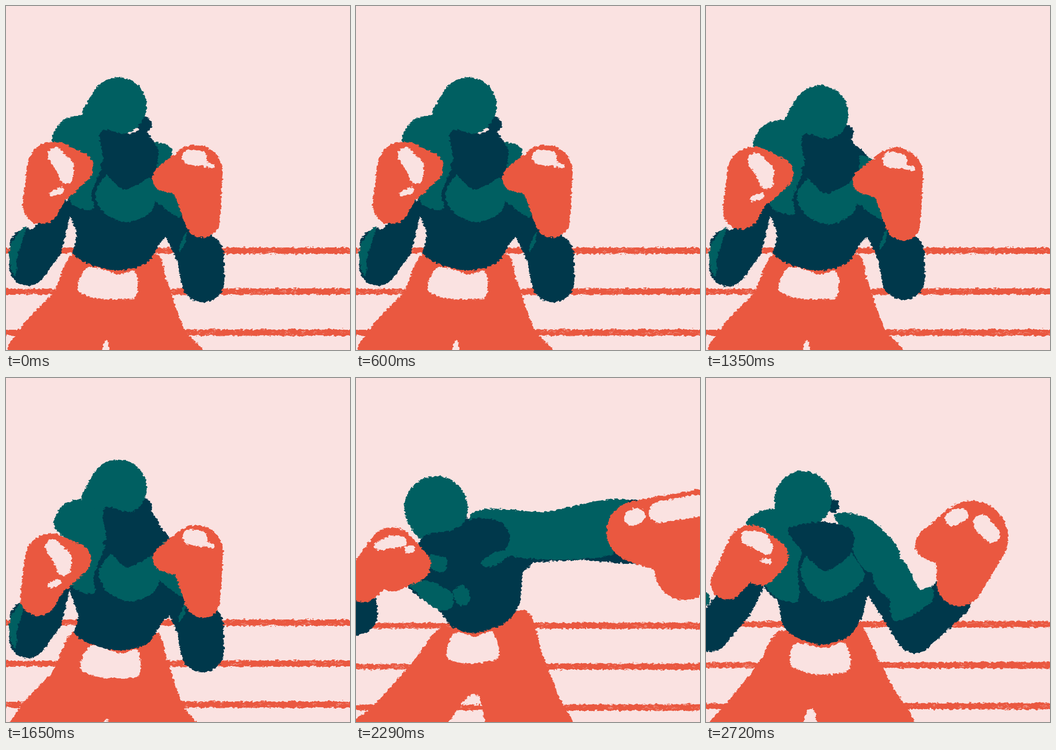
Recreate the animation shown at these times as an HTML page. Size 748 by 748 pixels, loop 2790 ms.

```html
<!DOCTYPE html>
<html lang="en">
<head>
<meta charset="utf-8">
<title>Boxer</title>
<style>
  html, body { margin: 0; width: 100%; height: 100%; overflow: hidden; background: #fae2e1; }
  svg { display: block; width: 100vw; height: 100vh; }
</style>
</head>
<body>
<svg viewBox="0 0 748 748">
  <filter id="chalk" filterUnits="userSpaceOnUse" x="-20" y="-20" width="788" height="788" color-interpolation-filters="sRGB">
    <feTurbulence type="fractalNoise" baseFrequency="0.14 0.2" numOctaves="3" seed="4"/>
    <feDisplacementMap in="SourceGraphic" scale="9" xChannelSelector="R" yChannelSelector="G"/>
  </filter>
  <g filter="url(#chalk)">
    <g id="ropes"></g>
    <g id="boxer"></g>
  </g>
</svg>
<script>
const PINK = '#fae2e1', RED = '#ea5840', TEAL = '#005f61', NAVY = '#00384b';
const LOOP = 2790;
const COLORS = {};
const paint = (color, names) => names.split(' ').forEach(name => COLORS[name] = color);
paint(RED, 'shorts gloveL gloveR');
paint(PINK, 'belt shineL glintL shineR glintR');
paint(NAVY, 'torso armL armR ear face');
paint(TEAL, 'back chest pecR shoulder head lightL lightR');

// Key points per part, in paint order: "x,y" bends a soft outline, "x,y,radius" is a disc in a limb.
const pose = parts => Object.fromEntries(Object.entries(parts).map(
  ([name, text]) => [name, text.split(' ').map(p => p.split(',').map(Number))]));

const guard = pose({
  shorts: '148,538 103,622 40,690 4,765 200,765 218,728 228,765 432,765 388,704 350,598 328,540 240,570',
  belt: '179,568 245,584 280,578 282,632 240,638 195,635 156,616',
  armR: '372,482,30 423,545,51 428,597,47',
  armL: '122,442,20 82,520,41 48,568,41 45,520,36',
  torso: '150,380 133,428 140,458 154,500 147,540 195,566 245,575 305,560 338,512 385,470 345,320 200,270',
  lightR: '392,492 392,500 390,515 378,535 376,530 382,510',
  lightL: '42,480 8,525 10,570 20,585 24,545 36,510',
  back: '165,238 122,250 100,292 130,330 138,424 165,441 190,441 186,410 230,270',
  chest: '195,400 210,447 262,470 316,446 325,390 260,340',
  pecR: '314,408 355,447 380,458 372,405 335,385',
  shoulder: '322,296 360,310 355,345 340,352 330,355 322,320',
  ear: '300,258,17',
  head: '244,217,62 186,236,21',
  face: '208,272 212,336 204,346 245,393 262,399 318,366 331,318 300,270 262,280',
  gloveL: '76,434,40 103,352,57 155,352,35 118,386,36',
  shineL: '107,325,17 128,350,20 131,372,15',
  glintL: '101,408,6 119,401,7',
  gloveR: '427,466,38 412,361,59 347,375,29',
  shineR: '400,328,17 420,331,17',
  glintR: '432,343,6 448,348,5'
});
const cross = pose({
  shorts: '145,520 80,630 30,710 0,765 220,765 234,737 246,765 400,765 370,660 340,600 320,528 220,550',
  belt: '250,573 290,558 326,533 334,574 300,608 256,626 248,600',
  armR: '350,420,40 365,460,45 380,420,40',
  lightR: '330,300 370,290 380,300 380,330 350,340 330,320',
  shineR: '410,260,5 410,262,5',
  glintR: '395,285,4 400,285,4',
  torso: '170,290 150,380 150,450 147,517 180,542 225,555 295,540 324,504 348,518 400,460 424,380 350,230',
  gloveR: '415,359,26 412,290,30 408,236,24',
  pecR: '200,400 210,420 230,420 230,400 215,390',
  shoulder: '250,300 280,300 280,330 270,340 255,335 245,320',
  chest: '190,400 195,430 220,450 250,430 250,400 220,380',
  back: '245,228 190,265 155,330 150,400 147,515 215,542 245,510 322,385 390,240',
  ear: '340,170,17',
  head: '335,174,64 290,215,30',
  face: '305,185 318,198 328,205 340,225 352,236 382,238 392,210 393,193 355,182',
  armL: '365,295,52 440,282,62 520,264,58 690,222,72',
  lightL: '370,238 682,153 652,202 505,257 312,322 308,270',
  gloveL: '752,205,79 790,170,80 790,210,80 765,212,78',
  shineL: '730,154,17 755,150,20 780,150,20',
  glintL: '694,170,9 699,175,10'
});
const jab = pose({
  shorts: '185,543 120,622 30,720 -20,765 180,765 258,687 292,765 468,765 440,690 405,600 368,506 260,548',
  belt: '215,555 260,562 297,553 309,607 265,620 230,620 197,605',
  armL: '5,490,40 5,515,42 -10,520,42 -20,510,40',
  armR: '375,352,50 490,342,53 600,334,70',
  torso: '150,340 110,445 145,482 182,507 205,538 232,551 262,554 325,532 356,490 362,425 385,398 270,305',
  lightL: '-30,420 -20,415 -10,420 -10,430 -20,435 -30,430',
  lightR: '250,296 410,291 590,265 545,325 555,386 300,380',
  back: '150,440 112,443 125,460 150,485 182,505 208,500 210,470 190,455 170,445',
  chest: '160,385 165,415 190,422 197,408 195,385 178,380',
  pecR: '230,450 211,465 225,495 245,488 246,465',
  ear: '190,280,17',
  head: '174,282,69 172,298,60',
  face: '210,330 150,343 138,365 165,383 240,395 318,378 335,345 318,315 262,305',
  shoulder: '335,375 335,385 318,397 295,411 272,404 300,380',
  gloveL: '15,445,42 78,378,53 126,406,37 80,428,36',
  shineL: '50,365,10 78,356,14 100,356,11',
  glintL: '113,373,8 121,372,8',
  gloveR: '612,334,67 770,345,106 715,417,66',
  shineR: '660,292,23 740,278,24',
  glintR: '600,304,17 612,300,17'
});
const reset = pose({
  shorts: '160,550 115,620 42,710 4,765 200,765 228,718 252,765 450,765 405,670 365,592 335,540 250,575',
  belt: '193,579 260,588 300,576 312,632 260,645 220,640 185,625',
  armR: '380,460,30 455,556,42 530,480,47',
  armL: '110,455,15 62,490,42 10,555,40 -20,540,40',
  torso: '150,380 127,455 155,485 165,530 178,552 210,570 255,580 315,558 342,512 350,478 375,420 200,300',
  lightR: '420,395 465,460 490,455 492,485 412,528 400,480',
  lightL: '-12,470 0,465 10,478 6,492 -10,500 -14,490',
  back: '160,283 115,290 88,318 130,330 130,452 160,480 200,485 200,415 230,270',
  chest: '206,412 222,462 262,486 315,465 345,425 260,340',
  pecR: '360,412 370,455 428,488 420,420 350,360',
  shoulder: '280,296 350,304 412,360 420,398 350,420 300,330',
  ear: '276,278,14',
  head: '211,264,62 175,285,25',
  face: '180,326 180,338 205,372 240,408 262,420 310,387 322,352 312,326 250,313',
  gloveL: '46,446,36 97,370,50 142,388,37 118,415,36',
  shineL: '92,347,16 118,355,20 132,370,14',
  glintL: '125,398,5 137,398,6',
  gloveR: '552,446,50 577,347,80 488,362,33',
  shineR: '600,316,19 621,340,18',
  glintR: '537,305,17 555,298,15'
});

function shifted(base, moves) {
  const result = { ...base };
  for (const [names, [dx, dy]] of Object.entries(moves))
    for (const name of names.split(' '))
      result[name] = base[name].map(([x, y, ...r]) => [x + dx, y + dy, ...r]);
  return result;
}

const low = shifted(guard, {
  'head ear': [8, 36], face: [6, 18], back: [5, 20], 'chest pecR': [8, 9], shoulder: [20, 60],
  'gloveL shineL glintL': [1, 23], 'gloveR shineR glintR': [2, 12],
  'armL lightL': [0, 3], 'armR lightR': [2, -10], torso: [2, 1], belt: [5, 0], shorts: [3, 0]
});
const rise = shifted(guard, {
  'head ear': [0, 22], face: [6, 12], back: [3, 26], 'chest pecR': [8, 16], shoulder: [20, 60],
  'gloveL shineL glintL': [-5, 43], 'gloveR shineR glintR': [1, 18],
  'armL lightL': [0, 1], 'armR lightR': [-1, -4], torso: [3, 17], belt: [6, 15], shorts: [0, 14]
});

const lerp = (a, b, t) => a + (b - a) * t;
const polar = ([x, y, r], angle) => `${x + r * Math.cos(angle)} ${y + r * Math.sin(angle)}`;

function limb(discs) {
  return discs.map((disc, i) => {
    const [x, y, r] = disc;
    const circle = `M${x - r} ${y}a${r} ${r} 0 0 1 ${2 * r} 0a${r} ${r} 0 0 1 ${-2 * r} 0Z`;
    const next = discs[i + 1];
    if (!next) return circle;
    const dx = next[0] - x, dy = next[1] - y;
    const aim = Math.atan2(dy, dx);
    const taper = (r - next[2]) / (Math.hypot(dx, dy) || 1);
    const open = Math.acos(Math.max(-1, Math.min(1, taper)));
    const corners = [polar(disc, aim + open), polar(disc, aim - open), polar(next, aim - open), polar(next, aim + open)];
    return circle + `M${corners.join('L')}Z`;
  }).join('');
}

// Handles follow the neighbours' direction and scale with the segment, so corners never overshoot.
function outline(pts) {
  const at = i => pts[(i + pts.length) % pts.length];
  const handle = (i, reach) => {
    const [p, a, b] = [at(i), at(i - 1), at(i + 1)];
    const scale = reach / (Math.hypot(b[0] - a[0], b[1] - a[1]) || 1);
    return [p[0] + (b[0] - a[0]) * scale, p[1] + (b[1] - a[1]) * scale];
  };
  return `M${pts[0]}` + pts.map((p, i) => {
    const q = at(i + 1);
    const reach = Math.hypot(q[0] - p[0], q[1] - p[1]) * 0.25;
    return `C${handle(i, reach)} ${handle(i + 1, -reach)} ${q}`;
  }).join('') + 'Z';
}

const fill = (d, color) => `<path d="${d}" fill="${color}"/>`;

function drawPose(from, to = from, t = 0) {
  return Object.keys(t < 0.5 ? from : to).map(name => {
    const pts = from[name].map((p, i) => p.map((v, k) => lerp(v, to[name][i][k], t)));
    return fill(pts[0].length === 3 ? limb(pts) : outline(pts), COLORS[name]);
  }).join('');
}

function drawRopes(step) {
  const phase = step % 5;
  let seed = 17 + phase * 101;
  const random = () => (seed = seed * 16807 % 2147483647) / 2147483647;
  const sag = step < 12 ? 0 : step < 20 ? (step - 11) * 0.8 : 6.4 - (step - 19) * 0.6;
  return [0, 1, 2].map(row => {
    const y = 532 + row * 89 + sag + (row ? 0 : phase === 2 ? 2 : 0);
    let flecks = '';
    for (let n = 0; n < 45; n++)
      flecks += `M${random() * 748} ${y + (random() - 0.4) * 8}l${4 + random() * 6} ${random() * 3 - 2}`;
    return fill(`M-20 ${y - 6}L768 ${y - 7}V${y + 7}L-20 ${y + 6}Z`, RED) +
      `<path d="${flecks}" stroke="${PINK}" stroke-width=".8" opacity=".6"/>`;
  }).join('');
}

const bob = [[guard], [guard, low, 0.5], [low], [rise]];
const steps = [
  ...bob, ...bob, ...bob,
  [rise, cross, 0.3], [rise, cross, 0.6], [rise, cross, 0.85], [cross],
  [cross, jab, 0.2], [cross, jab, 0.5], [cross, jab, 0.8], [jab],
  [jab, reset, 0.25], [jab, reset, 0.5], [jab, reset, 0.75], [jab, reset, 0.9], [reset]
];
const scenes = steps.map((step, i) => ({ ropes: drawRopes(i), boxer: drawPose(...step) }));

function stepAt(ms) {
  if (ms < 1800) return Math.floor(ms / 150);
  return ms < 2720 ? Math.min(23, 12 + Math.floor((ms - 1800) / 70)) : 24;
}

const start = performance.now();
let shown = -1;

function render() {
  const step = stepAt((performance.now() - start) % LOOP);
  if (step !== shown) {
    shown = step;
    for (const [id, markup] of Object.entries(scenes[step])) document.getElementById(id).innerHTML = markup;
  }
  requestAnimationFrame(render);
}
render();
</script>
</body>
</html>
```
